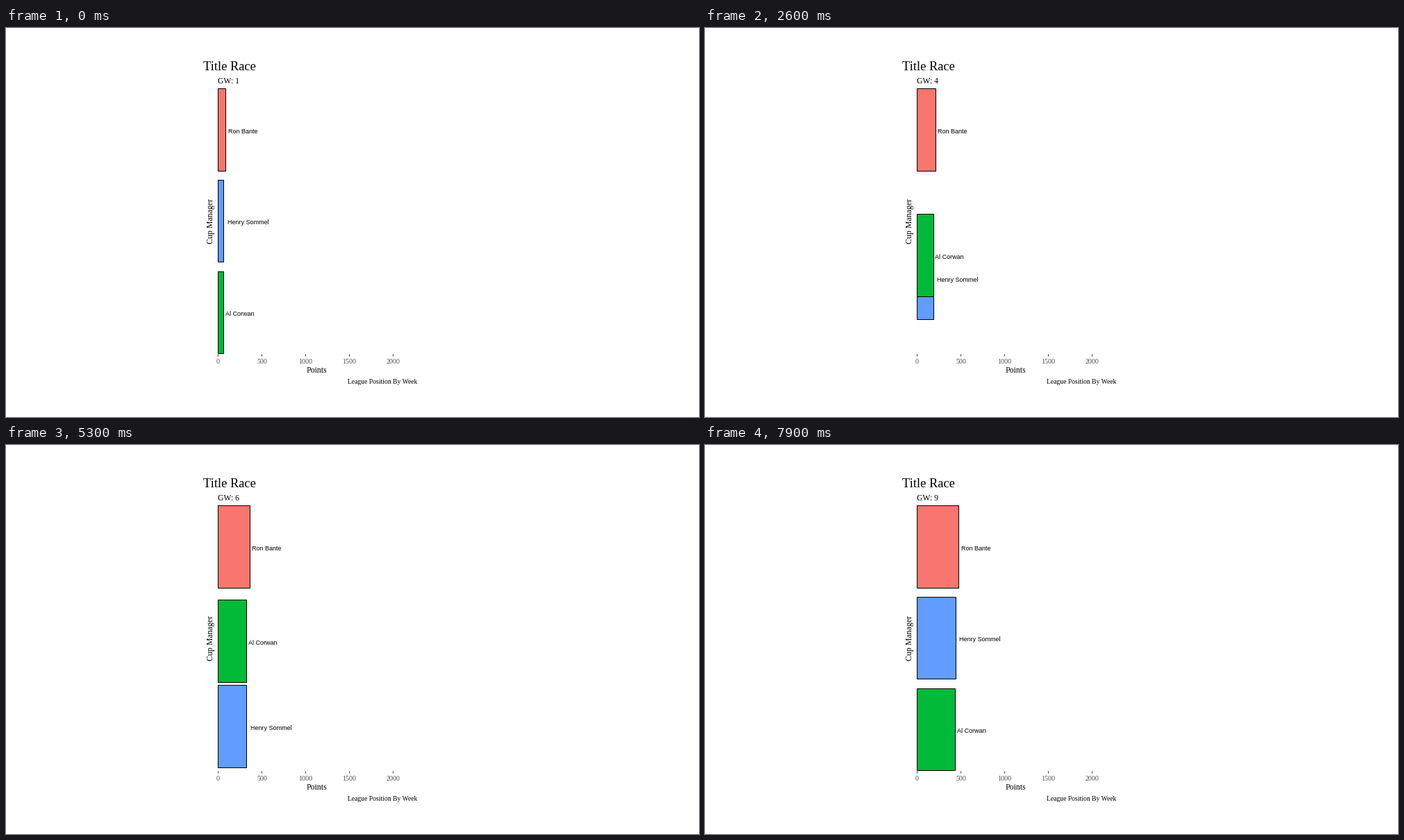
Animation, 998 px wide and 561 px high, one loop 8 s. Source, as a matplotlib script:

```python
import matplotlib.pyplot as plt
import numpy as np
from matplotlib.animation import FuncAnimation
from matplotlib.patches import Rectangle

W, H, DPI = 998, 561, 100
PT = 72 / DPI                      # points per pixel
X0, SCALE = 305, 0.126             # bar origin, pixels per point scored
TOP, STEP = 146.5, 131.7           # centre of the first bar, bar spacing
BAR_H = 0.9 * STEP
WEEK_FRAMES = 10.17                # mean frames between two weeks

# name, colour, label gap, points at the turning weeks
TURNS = [0, 1, 2, 4, 5, 8]
MANAGERS = [
    ("Ron Bante", "#F8766D", 3.6, [87, 135, 190, 265, 361, 480]),
    ("Henry Sommel", "#619CFF", 5.4, [67, 107, 163, 242, 325, 446]),
    ("Al Corwan", "#00BA38", 2.6, [66, 115, 151, 271, 326, 440]),
]

weeks = np.arange(9)
starts = np.round(weeks * WEEK_FRAMES)
points = np.array([np.interp(weeks, TURNS, m[3]) for m in MANAGERS])
ranks = (-points).argsort(axis=0).argsort(axis=0)

fig = plt.figure(figsize=(W / DPI, H / DPI), dpi=DPI, facecolor="white")
ax = fig.add_axes([0, 0, 1, 1])
ax.set_xlim(0, W)
ax.set_ylim(H, 0)
ax.axis("off")


def write(x, y, text, px, font="Liberation Serif", color="black", **kw):
    return ax.text(x, y, text, fontsize=px * PT, family=font, color=color, **kw)


def cubic_in_out(u):
    return 4 * u ** 3 if u < 0.5 else 1 - 4 * (1 - u) ** 3


write(284, 61, "Title Race", 18.4)
week = write(305, 80, "", 11.6)
write(301.5, 278.5, "Cup Manager", 11.9, rotation=90, ha="right", va="center")
write(447.5, 497, "Points", 11.8, ha="center")
write(592, 513, "League Position By Week", 9.6, ha="right")

for v in range(0, 2001, 500):
    x = X0 + v * SCALE
    ax.plot([x, x], [470, 473], color="#333333", lw=PT, solid_capstyle="butt")
    write(x + 0.5, 484, str(v), 10, color="#4D4D4D", ha="center")

bars, labels = [], []
for z, (name, color, *_) in enumerate(MANAGERS):
    bar = Rectangle((X0, 0), 0, BAR_H, fc=color, ec="black", lw=PT,
                    snap=True, zorder=3 + z)
    bars.append(ax.add_patch(bar))
    labels.append(write(0, 0, name, 9, "Liberation Sans", zorder=8))


def draw(i):
    k = int(np.searchsorted(starts, i, side="right")) - 1
    u = float((i - starts[k]) / (starts[k + 1] - starts[k]))
    p = cubic_in_out(u)
    week.set_text(f"GW: {round(k + u) + 1}")
    widths = SCALE * (points[:, k] * (1 - p) + points[:, k + 1] * p)
    mids = TOP + STEP * (ranks[:, k] * (1 - p) + ranks[:, k + 1] * p)
    for m, bar, label, width, mid in zip(MANAGERS, bars, labels, widths, mids):
        bar.set_y(mid - BAR_H / 2)
        bar.set_width(width)
        label.set_position((X0 + width + m[2], mid + 5.2))
    return [week, *bars, *labels]


anim = FuncAnimation(fig, draw, frames=80, interval=100, repeat=True,
                     repeat_delay=0, blit=False)
plt.show()
```
